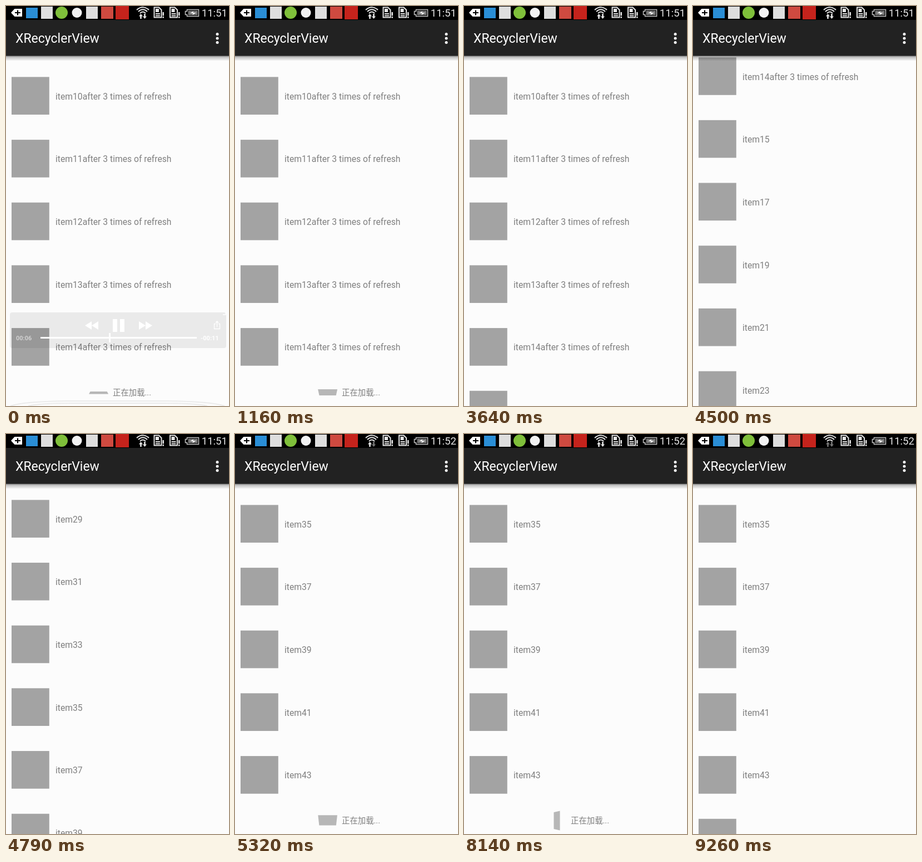
These frames come from a looping animation (401x718 px, 9.35 s). An HTML page:

```html
<!DOCTYPE html>
<html lang="en">
<head>
<meta charset="utf-8">
<title>XRecyclerView</title>
<style>
  html, body { margin: 0; width: 100%; height: 100%; overflow: hidden; background: #fcfcfc; }
  svg { display: block; width: 401px; height: 718px; font-family: Roboto, "Noto Sans CJK SC", "Noto Sans CJK", sans-serif; }
</style>
</head>
<body>
<svg viewBox="0 0 401 718">
  <defs>
    <linearGradient id="shade" x2="0" y2="1">
      <stop offset="0" stop-color="#000" stop-opacity=".5"/>
      <stop offset=".35" stop-color="#000" stop-opacity=".22"/>
      <stop offset="1" stop-color="#000" stop-opacity=".03"/>
    </linearGradient>
    <g id="sim">
      <path d="M1.5 2.5H10L14.5 7V20.5H1.5Z" fill="none" stroke="#e6e6e6" stroke-width="2"/>
      <path d="M4 5H10V11H4ZM4 13H12V15H4ZM4 16.500H12V18.500H4Z" fill="#e6e6e6"/>
      <path d="M16.500 11H19V17.500H16.500ZM16.500 19H19V21.500H16.500Z" fill="#e6e6e6"/>
    </g>
    <path id="skip" d="M0 0L12 -7.500V7.500ZM12 0L24 -7.500V7.500Z"/>
  </defs>
  <rect width="401" height="718" fill="#fcfcfc"/>
  <g id="list" font-size="15.7" fill="#7f7f7f"></g>
  <g id="footer">
    <path id="spinner" fill="#b7b7b7"/>
    <text x="192" y="699.3" font-size="14.4" fill="#7f7f7f">正在加载...</text>
  </g>

  <rect y="89" width="401" height="9" fill="url(#shade)"/>
  <rect width="401" height="89.500" fill="#222"/>
  <rect width="401" height="25" fill="#000"/>
  <text x="17" y="66" font-size="23" fill="#fff">XRecyclerView</text>
  <g fill="#fff">
    <circle cx="380" cy="50.500" r="2.500"/><circle cx="380" cy="58" r="2.500"/><circle cx="380" cy="65.500" r="2.500"/>
  </g>

  <path d="M9 12L15.500 5H29V19H15.500Z" fill="#fff"/>
  <path d="M16 12H26M21 7.500V16.500" stroke="#000" stroke-width="2.200"/>
  <rect x="36" y="3" width="21" height="19" fill="#2a8ed6"/>
  <rect x="63" y="1" width="21" height="22" fill="#dedede"/>
  <circle cx="100" cy="12" r="11" fill="#7fbf3a"/>
  <circle cx="127.500" cy="12" r="9" fill="#f2f2f2"/>
  <rect x="144" y="1" width="21" height="22" fill="#dedede"/>
  <rect x="171" y="1" width="22" height="22" fill="#cf4a40"/>
  <rect x="197" y="0" width="24" height="24" fill="#c5231c"/>
  <g fill="none" stroke="#e6e6e6" stroke-width="2">
    <path d="M235 7Q246 -2.500 257 7M238 10Q246 2.500 254 10M241 13Q246 8 251 13"/>
  </g>
  <path id="up" d="M242.500 14L246 18.500H243.800V23H241.200V18.500H239Z"/>
  <path id="down" d="M249.500 23L246 18.500H248.200V14H250.800V18.500H253Z"/>
  <use href="#sim" x="265"/>
  <use href="#sim" x="293.500"/>
  <path d="M325.500 6.500H346.500V18.500H325.500V15.500H322.500V9.500H325.500Z" fill="none" stroke="#c4c4c4" stroke-width="1.500"/>
  <rect x="327.500" y="8.500" width="17" height="8" fill="#777"/>
  <path d="M331 13L337 9.500L336.500 12H342L335.500 16L336 13Z" fill="#fff"/>
  <text id="clock" x="398" y="19" text-anchor="end" font-size="18.600" fill="#e6e6e6"></text>

  <g id="player" fill="#fff">
    <rect x="7" y="550" width="389" height="64" rx="4" fill="#000" fill-opacity=".07"/>
    <use href="#skip" x="142" y="573.500"/>
    <use href="#skip" transform="translate(263 573.500) scale(-1 1)"/>
    <path d="M192 562H200V585H192ZM205 562H213V585H205Z"/>
    <path d="M62 594H343V597H62ZM185 587H188V604H185Z"/>
    <path d="M377 570.500H374.500V579.500H384.500V570.500H382M379.500 576V566M377 568.500L379.500 566L382 568.500M390 554H395V550" fill="none" stroke="#fff" stroke-width="1.300"/>
    <g font-size="11" font-weight="700">
      <text x="18" y="600" fill-opacity=".55">00:06</text>
      <text x="350" y="600">-00:11</text>
    </g>
    <path d="M8 718Q30 710 110 709H290Q370 710 393 718M40 718Q60 713 120 713H280Q340 713 362 718" fill="none" stroke="#000" stroke-opacity=".07" stroke-width="2"/>
  </g>
</svg>
<script>
const $ = id => document.getElementById(id);
const LOOP = 9350, STEP = 112.67, TOP = 127.4;
const SCROLL = { from: 4340, to: 4900, rows: 15 };
const LOADED = [3640, 8750];
const SPIN = 2400, CX = 166.6, CY = 694, HALF = 16.2, DEPTH = 210;

const label = i => i < 5 ? `item${10 + i}after 3 times of refresh` : `item${5 + 2 * i}`;
$('list').innerHTML = Array.from({ length: 21 }, (_, i) => {
  const y = TOP + i * STEP;
  return `<rect x="10" y="${y}" width="67.8" height="67.6" fill="#a3a3a3"/>
    <text x="89" y="${y + 40.4}">${label(i)}</text>`;
}).join('');
const lastRow = [...$('list').children].slice(-2);

const clamp = v => Math.min(1, Math.max(0, v));
const show = (el, on) => el.setAttribute('visibility', on ? 'visible' : 'hidden');

// Half turn about X, about Y, then each one back.
function square(t) {
  const q = ((t % SPIN + SPIN) % SPIN) / SPIN * 4;
  const ax = Math.PI * (clamp(q) - clamp(q - 2));
  const ay = Math.PI * (clamp(q - 1) - clamp(q - 3));
  const corner = ([x, y]) => {
    const z1 = x * Math.sin(ay);
    const z = z1 * Math.cos(ax) - y * Math.sin(ax);
    const k = HALF * DEPTH / (DEPTH + z * HALF);
    const px = CX + x * Math.cos(ay) * k;
    const py = CY + (y * Math.cos(ax) + z1 * Math.sin(ax)) * k;
    return px.toFixed(2) + ' ' + py.toFixed(2);
  };
  return 'M' + [[-1, -1], [1, -1], [1, 1], [-1, 1]].map(corner).join('L') + 'Z';
}

function render(t) {
  const p = t < 4360 ? 0 : clamp((t - SCROLL.from) / (SCROLL.to - SCROLL.from));
  const shift = p * SCROLL.rows * STEP;
  $('list').setAttribute('transform', `translate(0 ${-shift})`);

  const scrolled = t >= 4360;
  const loading = t < LOADED[0] || (scrolled && t < LOADED[1]);
  const rest = scrolled ? SCROLL.rows * STEP - shift : 0;
  $('footer').setAttribute('transform', `translate(0 ${rest})`);
  show($('footer'), loading);
  $('spinner').setAttribute('d', square(scrolled ? t - 4907 : t + 273));

  [...$('list').children].slice(10, 12).forEach(el => show(el, t >= LOADED[0]));
  lastRow.forEach(el => show(el, t >= LOADED[1]));

  $('clock').textContent = t < 5320 ? '11:51' : '11:52';
  const downDim = (t > 2000 && t < 2900) || (t > 5300 && t < 6300) || t > 8200;
  $('up').setAttribute('fill', t > 8200 ? '#777' : '#e6e6e6');
  $('down').setAttribute('fill', downDim ? '#777' : '#e6e6e6');
  $('player').setAttribute('opacity', clamp(1 - (t - 30) / 350));
}

const start = performance.now();
function tick() {
  render((performance.now() - start) % LOOP);
  requestAnimationFrame(tick);
}
tick();
</script>
</body>
</html>
```
